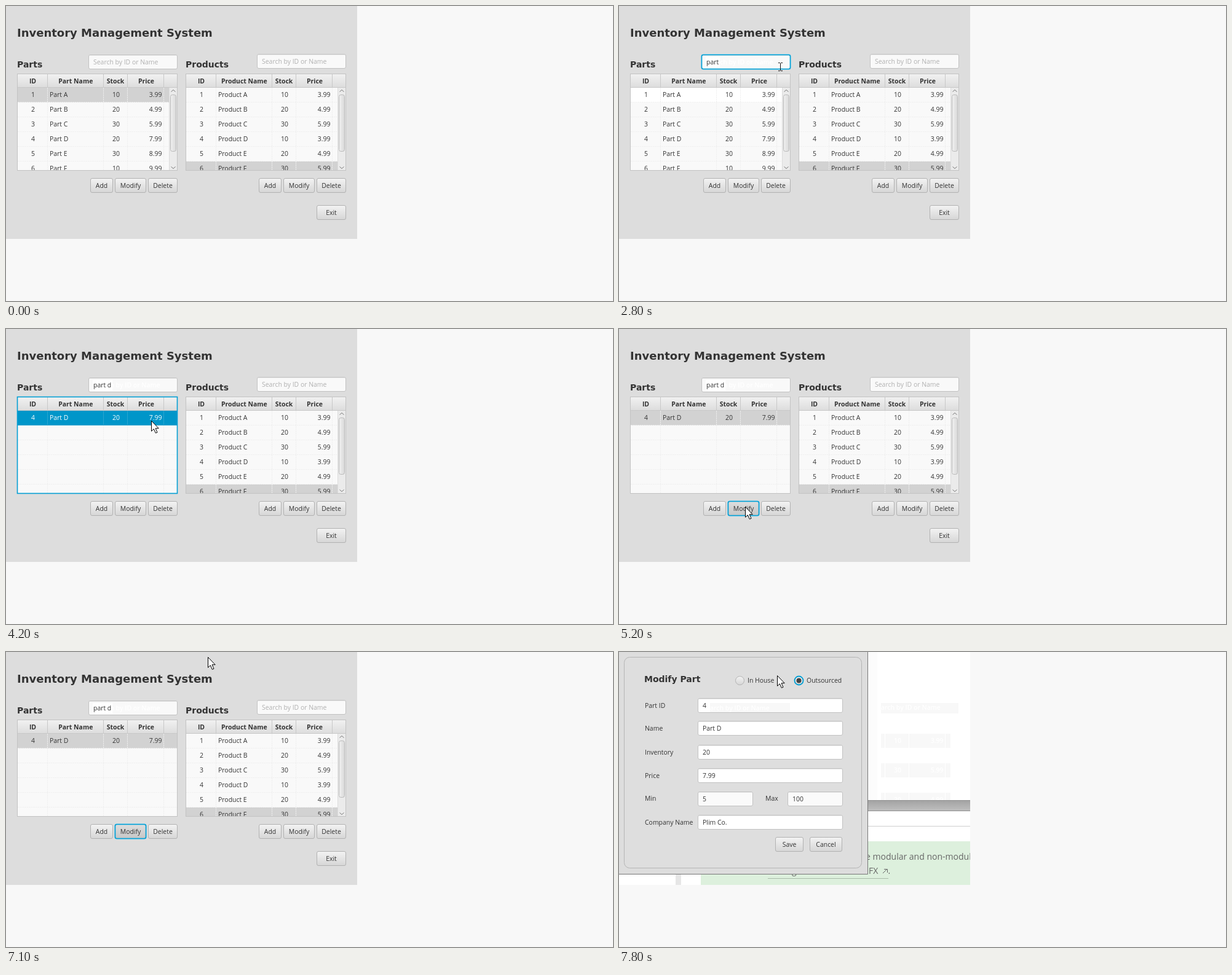
Write an HTML page that moves like this. It is 987 px wide and 480 px high and loops after 8000 ms.

```html
<!DOCTYPE html>
<html lang="en">
<head>
<meta charset="utf-8">
<title>Inventory Management System</title>
<style>
  html, body { margin: 0; width: 100%; height: 100%; overflow: hidden; background: #f8f8f8; }
  #stage { display: block; width: 987px; height: 480px; }
  text { font: 10.45px "Open Sans", "Noto Sans", sans-serif; fill: #333; white-space: pre; }
  .bold { font-weight: 700; }
  .title { font: 700 18px "DejaVu Sans", sans-serif; }
  .head { font: 700 14px "DejaVu Sans", sans-serif; }
  .page { font-size: 14px; fill: #666; }
  .mid { text-anchor: middle; }
  .end { text-anchor: end; }
  .prompt { fill: #b0b0b0; }
  .ghost { fill: #fff; font-weight: 600; }
  .light { fill: #fff; }
</style>
</head>
<body>
<svg id="stage" viewBox="0 0 987 480">
  <defs>
    <linearGradient id="button" x2="0" y2="1"><stop stop-color="#f3f3f3"/><stop offset="1" stop-color="#d6d6d6"/></linearGradient>
    <linearGradient id="pressed" x2="0" y2="1"><stop stop-color="#dedede"/><stop offset="1" stop-color="#c6c6c6"/></linearGradient>
    <linearGradient id="header" x2="0" y2="1"><stop stop-color="#f1f1f1"/><stop offset="1" stop-color="#dcdcdc"/></linearGradient>
    <linearGradient id="thumb"><stop stop-color="#f0f0f0"/><stop offset="1" stop-color="#d9d9d9"/></linearGradient>
    <linearGradient id="bar" x2="0" y2="1"><stop stop-color="#a2a2a2"/><stop offset="1" stop-color="#bebebe"/></linearGradient>
    <clipPath id="window"><path d="M0 0H571V379H0Z"/></clipPath>
  </defs>
</svg>
<script>
const LOOP = 8000, STEP = 100, BLUE = '#039ed3', PROMPT = 'Search by ID or Name';
const COLS = [67.5, 158.5, 197.5, 256.5];
const layers = [];
let parent = document.getElementById('stage');

function add(tag, attrs, text) {
  const node = document.createElementNS('http://www.w3.org/2000/svg', tag);
  for (const key in attrs) node.setAttribute(key, attrs[key]);
  if (text !== undefined) node.textContent = text;
  return parent.appendChild(node);
}
function inside(node, draw) {
  const outer = parent;
  parent = node;
  draw();
  parent = outer;
  return node;
}
function layer(from, to, draw) {
  layers.push({ node: inside(add('g', {}), draw), from, to });
}
const rect = (x, y, width, height, fill) => add('rect', { x, y, width, height, fill });
const label = (x, y, text, cls = '') => add('text', { x, y, class: cls }, text);
const path = (d, stroke, fill = 'none', width = 1) => add('path', { d, stroke, fill, 'stroke-width': width });

function box(x, y, w, h, fill, stroke, r = 2.5, line = 1) {
  return add('rect', { x: x + .5, y: y + .5, width: w - 1, height: h - 1, rx: r, fill, stroke, 'stroke-width': line });
}
function ring(x, y, w, h, r = 2.5) {
  box(x - 1, y - 1, w + 2, h + 2, 'none', '#9fd6ea', r + 1);
  box(x, y, w, h, 'none', BLUE, r, 1.6);
}
function button(x, y, w, text, fill = 'url(#button)') {
  box(x, y, w, 24, fill, '#b2b2b2');
  label(x + w / 2, y + 16, text, 'mid');
}
function field(x, y, w, text = '', fill = '#fff', cls = '') {
  box(x, y, w, 24, fill, '#c2c2c2');
  path(`M${x + 2} ${y + 1.5}h${w - 4}`, '#e6e6e6');
  if (text) label(x + 8, y + 16, text, cls);
}

function row(i, [id, name, stock, price], fill, cls = '') {
  const y = 133 + 24 * i;
  rect(19, y, 260, 24, fill);
  path(COLS.map(x => `M${x} ${y}v24`).join('') + `M19 ${y + 23.5}h260`, cls ? '#2aa5d0' : '#efefef')
    .setAttribute('stroke-dasharray', cls ? 'none' : '2 1');
  label(44, y + 15, id, cls + ' mid');
  label(71, y + 15, name, cls);
  label(179, y + 15, stock, cls + ' mid');
  label(253.5, y + 15, price, cls + ' end');
}
function body(draw) {
  inside(add('svg', { x: 19, y: 133, width: 259, height: 134, viewBox: '19 133 259 134' }), draw);
}
function scrollbar() {
  rect(265, 133, 14, 135, '#ebebeb');
  path('M265.5 133V267', '#dcdcdc');
  box(267, 144, 10, 93, 'url(#thumb)', '#b9b9b9', 3);
  path('M268.5 139.5L272 136.5L275.5 139.5M268.5 261.5L272 264.5L275.5 261.5', '#777');
}
function tableFrame(kind) {
  box(18, 110, 261, 158, '#f9f9f9', '#c3c3c3', 0);
  rect(19, 111, 259, 22, 'url(#header)');
  path(COLS.map(x => `M${x} 111v22`).join('') + 'M19 132.5H278', '#c8c8c8');
  label(43.5, 126, 'ID', 'bold mid');
  label(113.3, 126, kind + ' Name', 'bold mid');
  label(178, 126, 'Stock', 'bold mid');
  label(228, 126, 'Price', 'bold mid');
}
function fullTable(kind, stocks, prices, selected) {
  body(() => {
    stocks.forEach((stock, i) =>
      row(i, [i + 1, `${kind} ${'ABCDEF'[i]}`, stock, prices[i]], i === selected ? '#d2d2d2' : '#f9f9f9'));
    scrollbar();
  });
}
function tableButtons() {
  button(137, 280, 37, 'Add');
  button(177, 280, 51, 'Modify');
  button(231, 280, 48, 'Delete');
}

const PARTS = [[10, 20, 30, 20, 30, 10], ['3.99', '4.99', '5.99', '7.99', '8.99', '9.99']];
const PRODUCTS = [[10, 20, 30, 10, 20, 30], ['3.99', '4.99', '5.99', '3.99', '4.99', '5.99']];
const found = [4, 'Part D', 20, '7.99'];

let typed, typedBack, caret;

// Main window
layer(0, 7200, () => {
  rect(0, 0, 571, 379, '#ddd');
  label(18, 50, 'Inventory Management System', 'title');
  label(18, 100, 'Parts', 'head');
  label(292, 100, 'Products', 'head');

  field(134, 79, 145, '', '#f9f9f9');
  layer(0, 1000, () => label(142, 95, PROMPT, 'prompt'));
  layer(1000, LOOP, () => label(142, 95, PROMPT, 'ghost'));
  layer(1000, 4200, () => ring(134, 79, 145, 24));
  typedBack = rect(141, 83, 0, 17, '#fff');
  typed = label(142, 95, '');
  caret = rect(0, 84, 1, 15, '#111');

  tableFrame('Part');
  layer(0, 1900, () => fullTable('Part', ...PARTS, 0));
  layer(1900, 3000, () => {
    fullTable('Part', ...PARTS);
    body(() => {
      row(0, [1, 'Part A', 10, '3.99'], '#fff');
      scrollbar();
    });
  });
  layer(3000, LOOP, () => body(() => {
    for (let i = 1; i < 6; i++) row(i, ['', '', '', ''], '#f9f9f9');
  }));
  layer(3000, 4200, () => body(() => row(0, found, '#fff')));
  layer(4200, 5200, () => {
    body(() => row(0, found, '#0096c9', 'light'));
    box(18, 110, 261, 158, 'none', BLUE, 0, 1.6);
  });
  layer(5200, LOOP, () => body(() => row(0, found, '#d2d2d2')));
  tableButtons();
  layer(5200, LOOP, () => {
    button(177, 280, 51, 'Modify', 'url(#pressed)');
    ring(177, 280, 51, 24);
  });

  field(408, 78, 145, PROMPT, '#f9f9f9', 'prompt');
  inside(add('g', { transform: 'translate(274)' }), () => {
    tableFrame('Product');
    fullTable('Product', ...PRODUCTS, 5);
    tableButtons();
  });
  button(505, 324, 48, 'Exit');
});

function radio(x, text, on) {
  const circle = (r, fill, stroke, width = 1) =>
    add('circle', { cx: x, cy: 46.5, r, fill, stroke, 'stroke-width': width });
  circle(7, 'url(#button)', on ? BLUE : '#b2b2b2', on ? 1.8 : 1);
  if (on) circle(4, '#444', 'none');
  label(x + 12.5, 50, text);
}

// Web page behind the dialog
function webPage() {
  rect(0, 0, 571, 379, '#fff');
  rect(405, 0, 15, 241, '#fcfcfc');
  rect(426, 83, 126, 17, '#f8f8f8');
  label(426, 94, 'arch by ID or Name', 'ghost');
  [[133, 23, 10, '3.99'], [181, 23, 30, '5.99'], [229, 12, 20, '4.99']].forEach(([y, h, stock, price]) => {
    rect(426, y, 113, h, '#f8f8f8');
    path(`M432.5 ${y}v${h}M471.5 ${y}v${h}M530.5 ${y}v${h}`, '#fff');
    label(453, y + 15, stock, 'ghost mid');
    label(527.5, y + 15, price, 'ghost end');
  });
  rect(405, 241, 166, 17, 'url(#bar)');
  path('M405 241.5H571M405 258.5H571', '#8f8f8f');
  path('M405 283.5H571', '#cfcfcf');
  rect(92, 361, 9, 18, '#e6e6e6');
  rect(133, 308, 438, 71, '#ddf0dd');
  label(401, 338, 'e modular and non-modular', 'page');
  label(281, 361, 'g', 'page');
  label(406, 361, 'FX', 'page');
  path('M429 360L436 353M431 353.5H436.5V359', '#666');
  label(437.5, 361, '.', 'page');
  path('M242 368.5H438', '#a9bba9');
}

layer(7200, LOOP, () => inside(add('g', { 'clip-path': 'url(#window)' }), () => {
  webPage();
  rect(0, 0, 405, 362, '#ddd');
  path('M404.5 0V361.5H0', '#777');
  box(8, 8, 387, 344, '#dedede', '#b5b5b5', 9);
  label(41, 49, 'Modify Part', 'head');
  radio(196.5, 'In House', false);
  radio(292.5, 'Outsourced', true);
  [['Part ID', '4', 75], ['Name', 'Part D', 112], ['Inventory', '20', 151],
   ['Price', '7.99', 189], ['Company Name', 'Plim Co.', 265]].forEach(([name, value, y]) => {
    label(42, y + 16, name);
    field(128, y, 236, value);
  });
  rect(148, 83, 130, 15, '#f8f8f8');
  label(148, 95, 'arch by ID or Name', 'ghost');
  label(42, 242, 'Min');
  field(128, 227, 90, '5', '#fafafa');
  label(238, 242, 'Max');
  field(274, 227, 90, '100', '#fafafa');
  button(254, 301, 46, 'Save');
  button(310, 301, 53, 'Cancel');
}));

const arrow = path('M.5 .5V17.3L4.4 13.7L7.3 20.3L10 19.2L7.1 12.7H12.2Z', '#000', '#fff');
const beam = path('M-3 -6.5H-.5L.5 -5.5L1.5 -6.5H4M.5 -6V6M-3 6.5H-.5L.5 5.5L1.5 6.5H4', '#111');

// Pointer runs: start, steps, target x, target y
const runs = [
  [100, 7, 261, 93], [1000, 3, 263, 98], [1900, 2, 262, 99], [3800, 4, 236, 149],
  [4300, 4, 209, 276], [4700, 2, 205, 289], [5700, 2, 239, 256], [6200, 9, 333, 13],
  [7100, 1, 328, 8], [7300, 1, 326, 0], [7700, 2, 257, 38]
];
// Keystrokes: time, length of the text
const keys = [[1000, 0], [1800, 1], [1900, 2], [2000, 3], [2300, 4], [2900, 5], [3000, 6]];

function pointerAt(t) {
  let x = 440, y = 114;
  for (const [start, steps, tx, ty] of runs) {
    if (t < start) break;
    const left = 1 - Math.min(1, (Math.floor((t - start) / STEP) + 1) / steps);
    const ease = 1 - left * left;
    x += (tx - x) * ease;
    y += (ty - y) * ease;
  }
  return [Math.round(x), Math.round(y)];
}
const show = (node, on) => node.setAttribute('visibility', on ? 'inherit' : 'hidden');

function render(t) {
  for (const { node, from, to } of layers) node.style.display = t >= from && t < to ? '' : 'none';

  const [x, y] = pointerAt(t);
  const overField = t < 7200 && x >= 134 && x < 279 && y >= 79 && y < 103;
  arrow.setAttribute('transform', `translate(${x} ${y})`);
  beam.setAttribute('transform', `translate(${x} ${y})`);
  show(arrow, t >= 100 && !overField);
  show(beam, t >= 100 && overField);

  const [, length] = keys.filter(k => k[0] <= t).pop() || [0, 0];
  typed.textContent = 'part d'.slice(0, length);
  const width = length && t < 7200 ? typed.getComputedTextLength() : 0;
  typedBack.setAttribute('width', length ? width + 3 : 0);
  caret.setAttribute('x', Math.round(142 + width));
  const reset = keys.filter(k => k[0] <= t && k[0] !== 3000).pop();
  show(caret, reset && t < 4200 && (t - reset[0]) % 1000 < 500);
}

const begin = performance.now();
function tick() {
  render((performance.now() - begin) % LOOP);
  requestAnimationFrame(tick);
}
tick();
</script>
</body>
</html>
```
